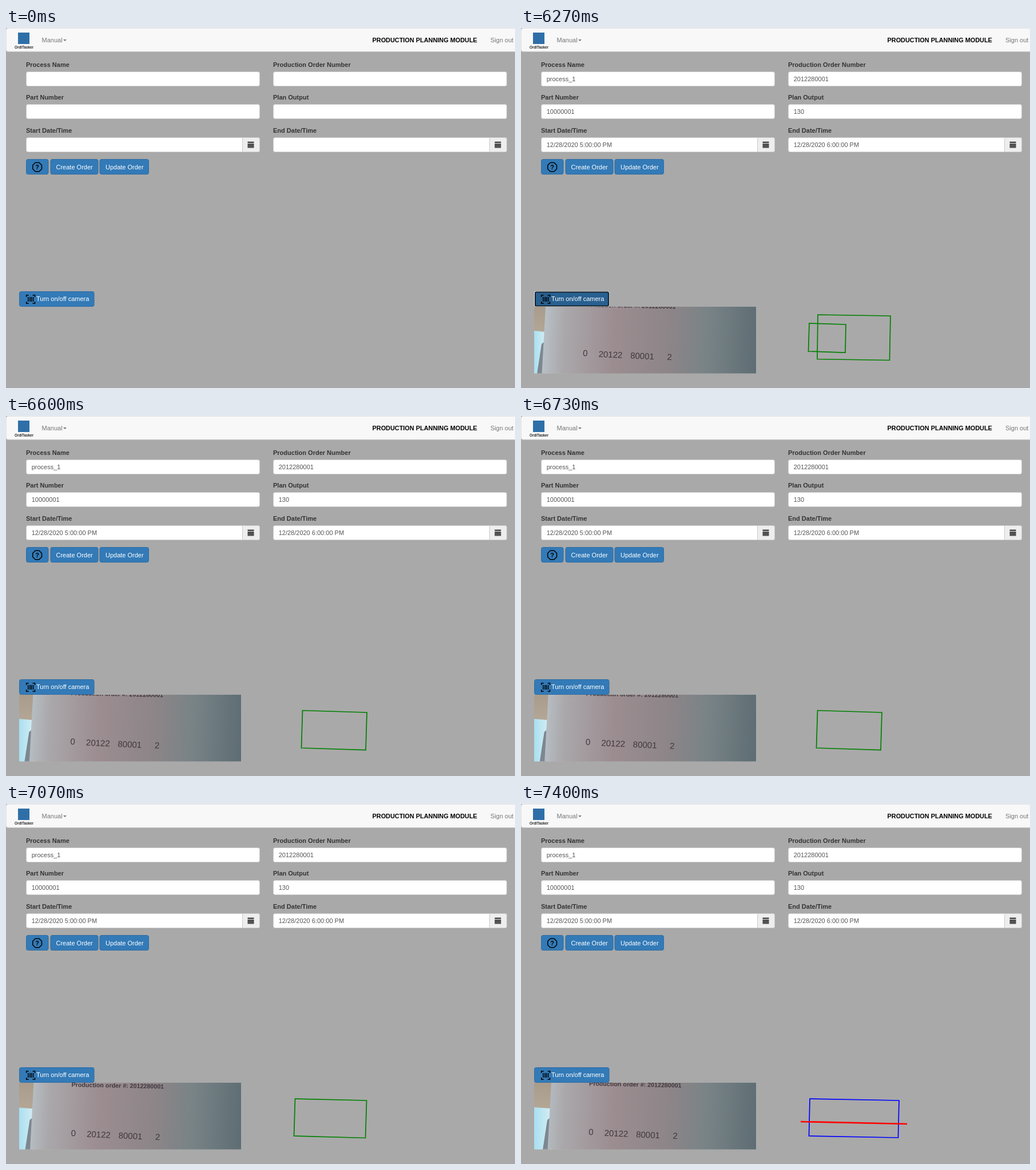
Recreate the animation shown at these times as an HTML page. Size 890 by 629 pixels, loop 7.47 s.

```html
<!DOCTYPE html>
<html lang="en">
<head>
<meta charset="utf-8">
<title>Production planning</title>
<style>
html, body { margin: 0; width: 100%; height: 100%; overflow: hidden; background: #a9a9a9; }
svg { display: block; font: 11px "Liberation Sans", Arial, sans-serif; }
.label { font-weight: bold; fill: #333; }
.value { fill: #555; }
.nav { fill: #777; }
.field { fill: #fff; stroke: #ccc; }
.addon { fill: #eee; stroke: #ccc; }
.button { fill: #337ab7; stroke: #2e6da4; }
.caption { fill: #fff; }
.icon { fill: none; stroke: #000; stroke-width: 1.5; }
#photo text { fill: #40383d; }
</style>
</head>
<body>
<svg id="stage" width="890" height="629" viewBox="0 0 890 629">
  <defs>
    <clipPath id="view"><rect x="23" y="487" width="388" height="116.5"/></clipPath>
    <linearGradient id="paper" gradientUnits="userSpaceOnUse" x1="36" y1="560" x2="411" y2="580">
      <stop offset="0" stop-color="#b9c2c8"/>
      <stop offset=".1" stop-color="#aaa8ab"/>
      <stop offset=".33" stop-color="#9c8d91"/>
      <stop offset=".6" stop-color="#8c8588"/>
      <stop offset=".77" stop-color="#788386"/>
      <stop offset="1" stop-color="#5e6d74"/>
    </linearGradient>
    <linearGradient id="wall" x2="0" y2="1">
      <stop offset="0" stop-color="#a99c8c"/>
      <stop offset="1" stop-color="#c4b7a5"/>
    </linearGradient>
    <linearGradient id="light" x2="1" y2="0">
      <stop offset="0" stop-color="#a9dff0"/>
      <stop offset="1" stop-color="#d5edf4"/>
    </linearGradient>
    <g id="calendar">
      <path d="M0 0h11v2.5H0zM0 3.5h11V11H0z" fill="#444"/>
      <path d="M1 5.5h9M1 7.5h9M1 9.5h9" stroke="#777" stroke-width=".6"/>
    </g>
  </defs>

  <rect x=".5" y=".5" width="896" height="40.5" rx="3" fill="#f8f8f8" stroke="#e2e2e2"/>
  <rect x="21" y="8" width="20" height="20" fill="#2f6fa8"/>
  <text x="31.5" y="35.5" text-anchor="middle" font-size="6.3" font-weight="bold" fill="#222">OrdiTasker</text>
  <text class="nav" x="62.5" y="25">Manual</text>
  <path class="nav" d="M100 20h6l-3 3z"/>
  <text x="640.5" y="25" font-weight="bold" font-size="10.9">PRODUCTION PLANNING MODULE</text>
  <text class="nav" x="847" y="25">Sign out</text>

  <g id="form"></g>
  <g id="values"></g>
  <g id="buttons"></g>
  <path class="icon" d="M51.3 235.2h6.6l4.6 4.6v6.4l-4.6 4.6h-6.6l-4.6-4.6v-6.4z"/>
  <text x="54.6" y="247" text-anchor="middle" font-weight="bold">?</text>

  <g id="focus">
    <rect x="23" y="460" width="131.5" height="27" rx="3" fill="#fff"/>
    <rect x="24.8" y="461.3" width="128.2" height="24.4" rx="2" fill="#286090" stroke="#101820" stroke-width="1.8"/>
  </g>
  <path class="icon" d="M35.7 470v-3.3h4M46.5 466.7h4v3.3M50.5 478v3.3h-4M39.7 481.3h-4V478"/>
  <path class="icon" d="M38.8 470v8M42 470v8M44.6 470v8M47.6 470v8"/>
  <text class="caption" x="53" y="477">Turn on/off camera</text>

  <g id="photo" clip-path="url(#view)">
    <rect x="23" y="487" width="60" height="117" fill="url(#wall)"/>
    <path id="window" fill="url(#light)"/>
    <path id="frame" fill="#7d8790"/>
    <path id="sheet" fill="url(#paper)"/>
    <g id="print">
      <text x="108" y="487" font-size="10.7" font-weight="bold" transform="rotate(1.2 108 487)">Production order #: 2012280001</text>
      <g font-size="15" transform="rotate(2.6 107 573)">
        <text x="107" y="573">0</text>
        <text x="134.5" y="573.5">20122</text>
        <text x="190" y="573.5">80001</text>
        <text x="254.5" y="573">2</text>
      </g>
    </g>
  </g>
  <g id="marks" fill="none"></g>
</svg>
<script>
const LOOP = 7470, SCAN = 6066, STEP = 1000 / 15;
const $ = id => document.getElementById(id);

const fields = [
  ["Process Name", "process_1", "Production Order Number", "2012280001"],
  ["Part Number", "10000001", "Plan Output", "130"],
  ["Start Date/Time", "12/28/2020 5:00:00 PM", "End Date/Time", "12/28/2020 6:00:00 PM"]
];

const text = (cls, x, y, s) => `<text class="${cls}" x="${x}" y="${y}">${s}</text>`;
const box = (cls, x, y, w, h) =>
  `<rect class="${cls}" x="${x + .5}" y="${y + .5}" width="${w - 1}" height="${h - 1}" rx="3"/>`;

fields.forEach((row, r) => {
  const y = Math.round(r * 57.4);
  for (const c of [0, 1]) {
    const x = 35 + 432 * c;
    $("form").innerHTML += text("label", x, 68 + y, row[2 * c]) + box("field", x, 76 + y, 409, 26);
    $("values").innerHTML += text("value", x + 9.7, 93 + y, row[2 * c + 1]);
    if (r == 2) $("form").innerHTML +=
      `<path class="addon" d="M${x + 378.5} 191.5h27.5q2.500 0 2.500 3v19q0 3-2.500 3h-27.500z"/>
       <use href="#calendar" x="${x + 387.5}" y="198.500"/>`;
  }
});

$("buttons").innerHTML =
  box("button", 35, 229, 39.5, 27) +
  box("button", 77.5, 229, 84, 27) + text("caption", 87.5, 247, "Create Order") +
  box("button", 163.5, 229, 86.5, 27) + text("caption", 174, 247, "Update Order") +
  box("button", 23, 460, 131.5, 27);

// Hand drift: time, x, y
const drift = [
  [6066, 0, 0], [6270, 1, 0], [6470, 5, 0], [6730, 5.7, 1.5],
  [7070, 6.5, 7], [7270, 9.5, 4.7], [7400, 11, 5]
];

// Scanner overlays, each shown from its start time
const overlays = [
  [6066, "green", "M519 501L646 503L644.5 580.5L518 578.5ZM504 516L568 518L567 567L502.5 565Z"],
  [6464, "blue", "M518.5 513L647 519L643.5 585L515.5 579Z", "M506 520.500L659 527.500"],
  [6596, "green", "M518.500 514.500L631 518L629 583.500L516.500 580Z"],
  [6930, "green", "M505.500 515L630.500 518L628.500 583.500L503.500 580Z"],
  [7196, "green", "M518.500 515.500L645 517.500L643.500 582L517.500 579.500Z"],
  [7396, "blue", "M505 515L661 518L659.500 583L503.500 580Z", "M489 555L675 559"]
];

function driftAt(t) {
  const i = drift.findIndex(k => k[0] > t);
  if (i < 0) return drift.at(-1).slice(1);
  const a = drift[Math.max(i - 1, 0)], b = drift[i];
  const p = Math.max(0, (t - a[0]) / (b[0] - a[0]));
  return [1, 2].map(n => a[n] + (b[n] - a[n]) * p);
}

function draw(time) {
  const now = time % LOOP, on = now >= SCAN;
  for (const id of ["values", "photo", "marks"]) $(id).style.display = on ? "" : "none";
  $("focus").style.display = on && now < 6596 ? "" : "none";
  if (on) {
    // The camera delivers 15 pictures a second; the first one stays for 200 ms
    const tick = Math.floor((now - 6000 + 4) / STEP);
    const t = tick < 4 ? SCAN : 6000 + tick * STEP;
    const [x, y] = driftAt(t);
    $("print").setAttribute("transform", `translate(${x} ${y})`);
    $("sheet").setAttribute("d", `M${42 + x} 487H411V604H${35.5 + x}Z`);
    $("window").setAttribute("d", `M23 ${529 + y / 5}L${42 + x} ${531 + y / 5}V604H23Z`);
    $("frame").setAttribute("d", `M${35 + x} 552L${40 + x} 548V604H${27 + x}Z`);
    const [, color, path, line] = overlays.findLast(o => o[0] <= now + 1) || overlays[0];
    $("marks").innerHTML = `<path d="${path}" stroke="${color}" stroke-width="1.7"/>` +
      (line ? `<path d="${line}" stroke="red" stroke-width="2.6"/>` : "");
  }
  requestAnimationFrame(draw);
}
draw(performance.now());
</script>
</body>
</html>
```
